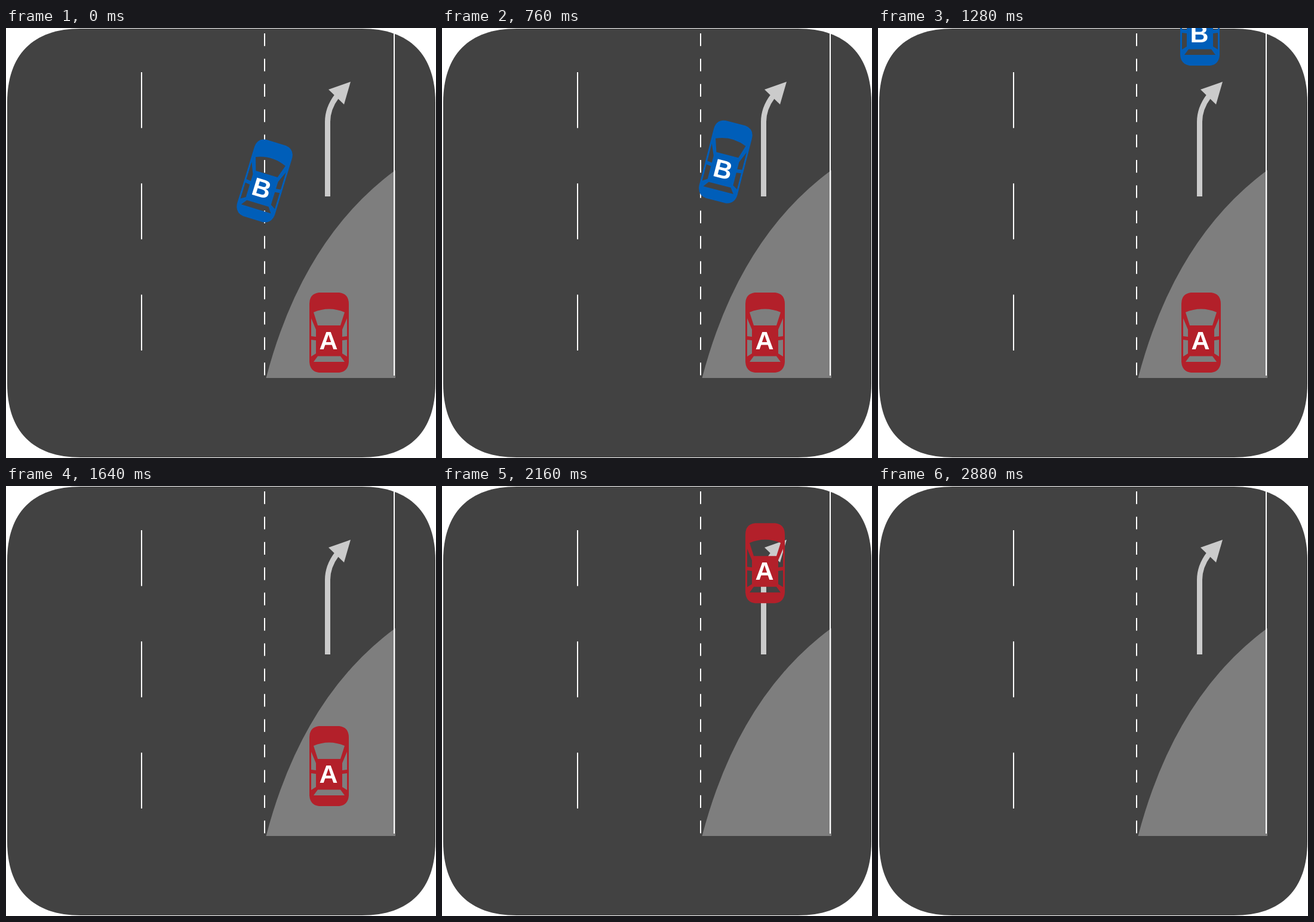
An HTML page for the animation above (2920 ms loop, 720 px wide and 720 px high).

```html
<!DOCTYPE html>
<html lang="en">
<head>
<meta charset="utf-8">
<title>Two cars leaving a lane</title>
<style>
  html, body { margin: 0; width: 100%; height: 100%; overflow: hidden; background: #fff; }
  svg { display: block; width: 100vw; height: 100vh; }
  text { font: bold 43px "Liberation Sans", Arial, sans-serif; fill: #fff; text-anchor: middle; }
</style>
</head>
<body>
<svg viewBox="0 0 720 720">
  <defs>
    <!-- Car seen from above, centred on 0,0; the windows are holes -->
    <path id="car" fill-rule="evenodd" d="
      M-17 -67 H17 Q33 -65 33 -48 V49 Q32 65 17 67 H-17 Q-32 65 -33 49 V-48 Q-33 -65 -17 -67 Z
      M-26 -34 Q0 -45 26 -34 L19 -12 H-19 Z
      M-30 -24 L-22 -5 V7 L-30 6 Z
      M30 -24 L22 -5 V7 L30 6 Z
      M-30 12 L-22 13 V35 L-30 40 Z
      M30 12 L22 13 V35 L30 40 Z
      M-19 39.5 H19 L26 49 H-26 Z"/>
  </defs>

  <path fill="#424242" d="M125 1 H596 C676 1 719 45 719 125 V595 C719 675 676 719 596 719
    H125 C45 719 2 675 2 595 V125 C2 45 45 1 125 1 Z"/>
  <path fill="#7e7e7e" d="M435.5 586 Q497 352 652 238 V586 Z"/>

  <g stroke="#fff" stroke-width="2">
    <path d="M227 74 V540" stroke-dasharray="93.5 92.8"/>
    <path d="M433 9 V582" stroke-dasharray="21.2 21.2"/>
    <path d="M650 9 V582"/>
  </g>

  <path fill="none" stroke="#cbcbcb" stroke-width="9" d="M538.5 282 V157 C538.5 141 545 126 554 114"/>
  <path fill="#cbcbcb" d="M577 90 L540 103 L566 128 Z"/>

  <g id="carA">
    <use href="#car" fill="#b3202a"/>
    <text x="-1" y="28">A</text>
  </g>
  <g id="carB">
    <use href="#car" fill="#005eb9"/>
    <text x="-1" y="28">B</text>
  </g>
</svg>
<script>
  const LOOP = 2920, STEP = 40;
  const carA = document.getElementById("carA");
  const carB = document.getElementById("carB");

  function place(car, x, y, angle) {
    car.setAttribute("transform", `translate(${x} ${y}) rotate(${angle})`);
  }

  // Steps elapsed since a start time, never negative
  const stepsSince = (time, start) => Math.max(0, (time - start) / STEP);

  function draw(time) {
    const riseB = 0.65 * stepsSince(time, 480) ** 2;
    const driftB = 108 * (1 - Math.exp(-riseB / 65));
    const angleB = 17 * Math.max(0, 1 - riseB / 212);
    place(carB, 433 + driftB, 256 - riseB, angleB);

    const riseA = 4.25 * stepsSince(time, 1472) ** 1.58;
    place(carA, 541, 510 - riseA, 0);
  }

  const startTime = performance.now();
  function tick() {
    const time = (performance.now() - startTime) % LOOP;
    draw(Math.floor(time / STEP) * STEP);
    requestAnimationFrame(tick);
  }
  tick();
</script>
</body>
</html>
```
